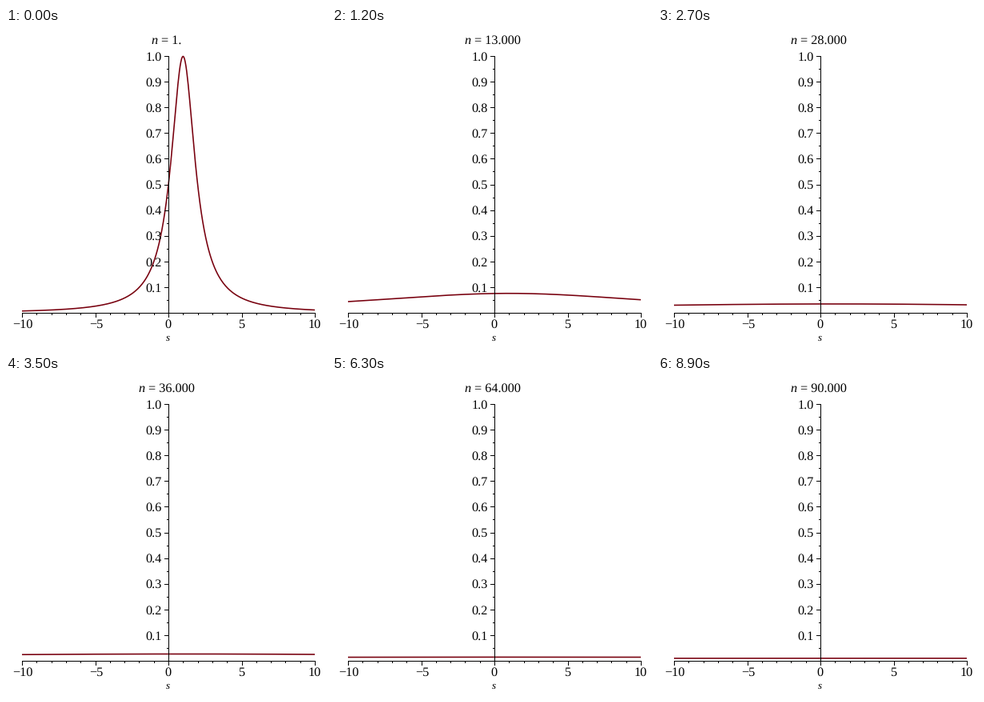
These frames come from a looping animation (400x400 px, 9 s). A matplotlib script:

```python
import numpy as np
import matplotlib.pyplot as plt
from matplotlib.animation import FuncAnimation

FRAMES = 90
LEFT, TOP, BASE = 19.5, 34.5, 355.5
WIDTH, HEIGHT = 366, 321
INK = "#000000"
CURVE = "#78000e"

plt.rcParams["font.family"] = "Liberation Serif"
plt.rcParams["text.hinting"] = "none"

# At 72 dpi one point equals one pixel.
fig = plt.figure(figsize=(400 / 72, 400 / 72), dpi=72, facecolor="white")
ax = fig.add_axes([0, 0, 1, 1])
ax.set(xlim=(0, 400), ylim=(400, 0))
ax.axis("off")


def px(s):
    return LEFT + (s + 10) * WIDTH / 20


def py(v):
    return BASE - v * HEIGHT


def line(x0, y0, x1, y1):
    """One-pixel line between pixel centres."""
    xs = np.floor([x0, x1]) + 0.5
    ys = np.floor([y0, y1]) + 0.5
    ax.plot(xs, ys, color=INK, lw=1, solid_capstyle="projecting", zorder=3)


def label(x, y, text, size=16.3, **kw):
    return ax.text(x, y, text, size=size, color=INK, va="baseline", zorder=4, **kw)


def draw_axes():
    line(px(-10), BASE, px(10), BASE)
    line(px(0), TOP, px(0), BASE)
    for s in range(-10, 11):
        major = s % 5 == 0
        line(px(s), BASE, px(s), BASE + (5 if major else 2))
        if major:
            text = str(s).replace("-", "\u2212")
            label(px(s) + (1.5 if s < 0 else 0), 375, text, ha="center")
    for k in range(1, 21):
        y = py(k / 20)
        major = k % 2 == 0
        line(px(0) - (5 if major else 2), y, px(0), y)
        if major:
            label(194.6, y + 6, f"{k / 20:.1f}", ha="right")
    label(202, 391, "s", size=13, style="italic", ha="center")


draw_axes()
s = np.linspace(-10, 10, 401)
curve, = ax.plot([], [], color=CURVE, lw=1.6, solid_capstyle="butt", zorder=2)
name = label(165.5, 20, "n", style="italic")
value = label(177.5, 20, "")


def number(n):
    if n == 1:
        return "1."
    return f"{n:.4f}" if n < 10 else f"{n:.3f}"


def update(i):
    n = i + 1
    # The curve sits slightly right of and below the axis pixels.
    curve.set_data(px(s) + 0.5, py(n / (n**2 + (s - 1) ** 2)) + 0.9)
    x = 181.5 if n == 1 else 165.5
    name.set_x(x)
    value.set_x(x + 12)
    value.set_text("= " + number(n))
    return curve, name, value


anim = FuncAnimation(fig, update, frames=FRAMES, interval=100, repeat=True, repeat_delay=0)
plt.show()
```
